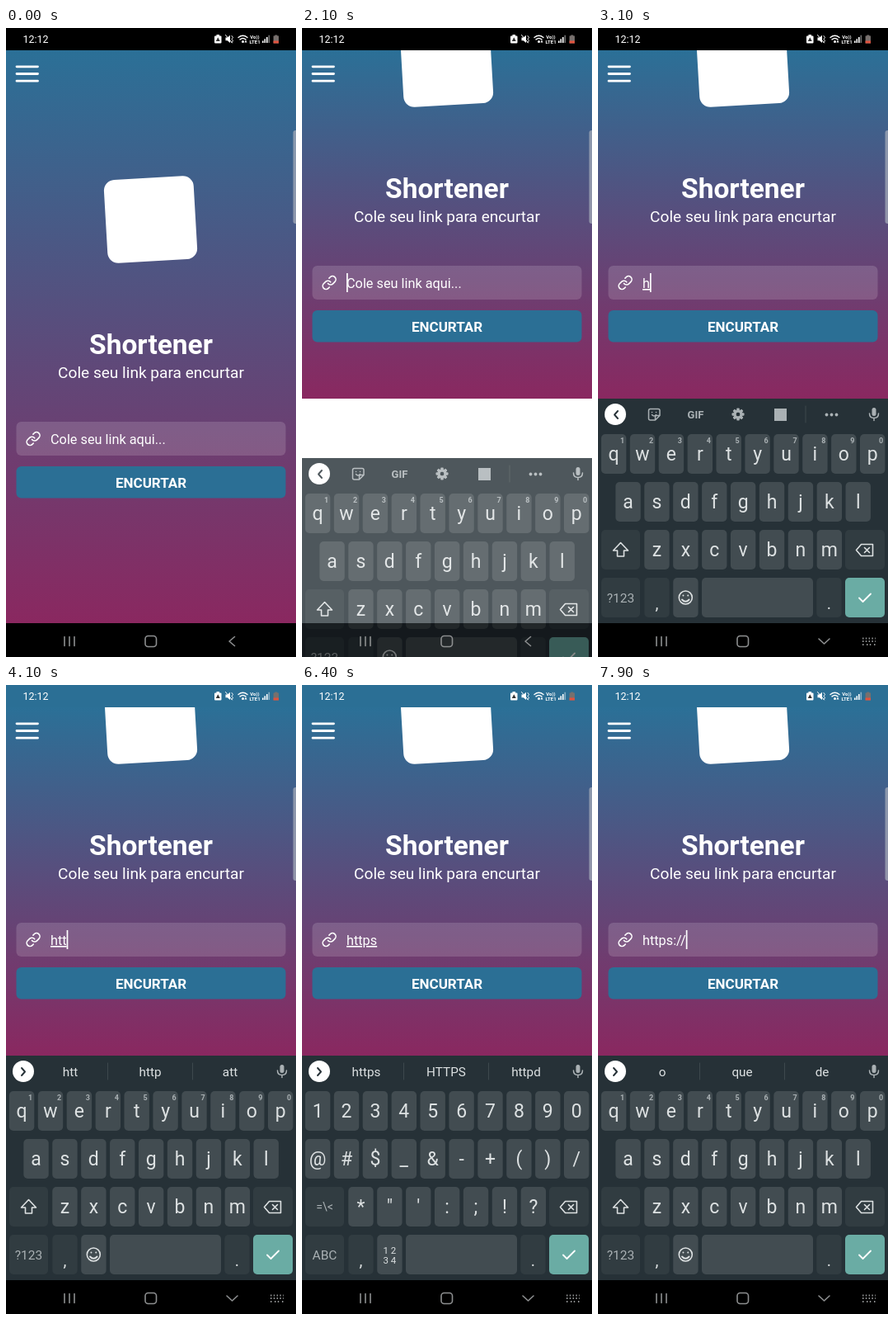
An HTML page that plays this animation: 352 by 762 pixels, repeating every 8000 ms.

```html
<!DOCTYPE html>
<html lang="pt">
<head>
<meta charset="utf-8">
<title>Shortener</title>
<style>
  html, body { margin: 0; width: 100%; height: 100%; overflow: hidden; background: #000; }
  svg { display: block; width: 100vw; height: 100vh; font-family: Roboto, "Noto Sans", sans-serif; }
  .mid { text-anchor: middle; }
  .line { fill: none; stroke-linecap: round; stroke-linejoin: round; }
</style>
</head>
<body>
<svg viewBox="0 0 352 762">
  <defs>
    <linearGradient id="sky" x1="0" y1="0" x2="0" y2="1">
      <stop offset="0" stop-color="#2b7097"/><stop offset="1" stop-color="#8a2860"/>
    </linearGradient>
    <clipPath id="view"><rect y="27" width="352" height="694"/></clipPath>
  </defs>

  <rect width="352" height="762" fill="#000"/>
  <rect y="27" width="352" height="694" fill="#fff"/>
  <rect id="page" y="27" width="352" height="694" fill="url(#sky)"/>
  <g clip-path="url(#view)">
    <g id="content" fill="#fff">
      <rect x="121" y="181.500" width="109" height="101" rx="13" transform="rotate(-3.300 175.500 232)"/>
      <text class="mid" x="176" y="395" font-size="33.500" font-weight="700">Shortener</text>
      <text class="mid" x="176" y="424" font-size="19.100">Cole seu link para encurtar</text>
      <rect x="12.500" y="477" width="327" height="41" rx="6" fill-opacity=".15"/>
      <g class="line" stroke="#fff" stroke-width="2" transform="translate(23.500 488) scale(.8)">
        <path d="M10 13a5 5 0 0 0 7.540.540l3-3a5 5 0 0 0-7.070-7.070l-1.720 1.710"/>
        <path d="M14 11a5 5 0 0 0-7.540-.540l-3 3a5 5 0 0 0 7.070 7.070l1.710-1.710"/>
      </g>
      <text id="field" x="54" y="504" font-size="16.300"></text>
      <rect id="caret" y="486" width="1.700" height="23"/>
      <rect x="12.500" y="531" width="327" height="38.500" rx="6" fill="#2b6f95"/>
      <text class="mid" x="176" y="557" font-size="17" font-weight="700">ENCURTAR</text>
    </g>
  </g>
  <path class="line" d="M13 46.800H38.500M13 55.500H38.500M13 64.200H38.500" stroke="#fff" stroke-width="2.800"/>
  <rect x="348.500" y="124" width="8" height="113" rx="3" fill="#a5abb8" opacity=".75"/>

  <rect id="statusBar" width="352" height="27"/>
  <g fill="#fff">
    <text x="20.500" y="18" font-size="12.500">12:12</text>
    <path d="M254 9.500h1.500v-1.500h3.500v1.500h1.500q1 0 1 1v7q0 1-1 1h-6.500q-1 0-1-1v-7q0-1 1-1z"/>
    <path d="M257.300 11.300l2.500 4.700h-5z" fill="#333"/>
    <path d="M266.500 11.500h2.300l3.200-2.800v9.300l-3.200-2.800h-2.300z"/>
    <path class="line" d="M266.500 8.500l8 9.500M274 9.500l1.500 2-1.500 2 1.500 2-1.500 2" stroke="#fff"/>
    <path class="line" d="M282 11.500q5.500-4.600 11 0M284 13.900q3.500-2.700 7 0" stroke="#fff" stroke-width="1.400"/>
    <circle cx="287.500" cy="16.600" r="1.500"/>
    <path d="M291 14.500l1.500 3h-3z"/>
    <text class="mid" x="302" y="12.500" font-size="6" font-weight="700">Vo))</text>
    <text class="mid" x="302" y="18.700" font-size="6" font-weight="700">LTE1</text>
    <path d="M311 15.500h1.600v2.500h-1.600zM313.500 13.300h1.600v4.700h-1.600zM316 11h1.600v7h-1.600z"/>
    <path d="M318.500 8.700h1.600v9.300h-1.600z" opacity=".45"/>
    <path d="M326.300 8.500h3v1h1.700v9h-6.400v-9h1.700z" fill="#77706e"/>
    <path d="M324.600 15.500h6.400v3h-6.400z" fill="#e0523e"/>
  </g>

  <g id="keyboard"></g>
  <rect id="navShade" y="721" width="352" height="41"/>
  <g class="line" stroke="#8d8f90" stroke-width="1.600">
    <path d="M71 737.500v11M77 737.500v11M83 737.500v11"/>
    <rect x="169" y="736.500" width="13.500" height="13" rx="3.500"/>
    <path id="back" d="M277.500 737.500l-6.500 5.500 6.500 5.500"/>
    <g id="hide">
      <path d="M268 740l6.500 6 6.500-6"/>
      <path d="M321 739.500h16M321 743h16M321 747h2M326 747h6M335 747h2" stroke-dasharray="1.500 2.300" stroke-linecap="butt" stroke-width="2"/>
    </g>
  </g>
</svg>
<script>
const LOOP = 8000;
const PITCH = 34.9, KEY_W = 30.4, KEY_H = 48;
const ROWS = [492, 550, 608, 666];
const KEY = "#424c51", DIM_KEY = "#313c41", INK = "#dde1e2", SOFT = "#aab1b4";
const el = id => document.getElementById(id);
const column = n => 19.1 + n * PITCH;
const escapeXml = s => s.replace(/&/g, "&amp;").replace(/</g, "&lt;");

const label = (text, x, y, size, fill = INK, extra = "") =>
  `<text class="mid" x="${x}" y="${y}" font-size="${size}" fill="${fill}" ${extra}>${escapeXml(text)}</text>`;
const box = (x, y, w, fill = KEY, h = KEY_H) =>
  `<rect x="${x}" y="${y}" width="${w}" height="${h}" rx="5" fill="${fill}"/>`;
const icon = (d, stroke = INK, width = 1.6) =>
  `<path class="line" d="${d}" stroke="${stroke}" stroke-width="${width}"/>`;

const spots = {};
function keyRow(chars, row, first, hints = "") {
  return [...chars].map((ch, i) => {
    const x = column(first + i), y = ROWS[row];
    spots[ch] = { x, y };
    return box(x - KEY_W / 2, y, KEY_W) + label(ch, x, y + 32, 23) +
      (hints ? label(hints[i], x + 10.5, y + 10.5, 9, SOFT, 'font-weight="700"') : "");
  }).join("");
}

function sharedKeys() {
  return box(4, ROWS[2], 47, DIM_KEY) + box(300, ROWS[2], 48, DIM_KEY) +
    icon("M319.500 625.500h14v14h-14l-6-7zM323.500 629.500l6 6M329.500 629.500l-6 6") +
    box(4, ROWS[3], 47, DIM_KEY) +
    box(56.3, ROWS[3], KEY_W, DIM_KEY) + label(",", 71.5, 704, 20) +
    box(91.2, ROWS[3], KEY_W) + box(126, ROWS[3], 135) +
    box(265.3, ROWS[3], KEY_W, DIM_KEY) + label(".", 280.5, 704, 20) +
    box(300, ROWS[3], 48, "#6aaca4") + icon("M317 690.500l4.500 4.500 9.500-9.500", "#fff", 1.8);
}

function letterKeys() {
  return keyRow("qwertyuiop", 0, 0, "1234567890") + keyRow("asdfghjkl", 1, .5) + keyRow("zxcvbnm", 2, 1.5) +
    icon("M27.500 623.500l9 9.500h-5v7h-8v-7h-5z") + label("?123", 27.5, 696, 15.5, SOFT) +
    `<circle class="line" cx="106.300" cy="690" r="8" stroke="${INK}" stroke-width="1.600"/>` +
    icon("M102 692.500q4.300 4.500 8.600 0M103.400 687.500h.1M109.200 687.500h.1", INK, 1.9);
}

function symbolKeys() {
  return keyRow("1234567890", 0, 0) + keyRow("@#$_&-+()/", 1, 0) + keyRow("*\"':;!?", 2, 1.5) +
    label("=\\<", 27.5, 637, 14, SOFT) + label("ABC", 27.5, 696, 15.5, SOFT) +
    label("1 2", 106.3, 688.5, 11.5) + label("3 4", 106.3, 700.5, 11.5);
}

function toolIcons() {
  const teeth = Array.from({ length: 8 }, (_, i) =>
    `<rect x="168.200" y="460.500" width="3.600" height="5" rx="1" transform="rotate(${i * 45} 170 468)"/>`).join("");
  return icon("M24 464l-4 4.500 4 4.500", "#263137", 1.9) +
    icon("M63.500 461.500h9.500q2 0 2 2v6l-5.500 5.500h-6q-2 0-2-2v-9.500q0-2 2-2zM75 469.500h-3.500q-2 0-2 2v3.500M65.500 468.500q2.500 3 5 0M65.500 465.500h.1M70.500 465.500h.1", SOFT, 1.5) +
    label("GIF", 118.5, 473, 13, SOFT, 'font-weight="700"') +
    `<g fill="${SOFT}">${teeth}</g><circle cx="170" cy="468" r="4" fill="none" stroke="${SOFT}" stroke-width="3"/>` +
    `<rect x="214" y="461" width="15" height="15" fill="${SOFT}"/>` +
    icon("M252 458v20", "#3d484d", 1) +
    [277.5, 283.5, 289.5].map(x => `<circle cx="${x}" cy="468.500" r="1.900" fill="${SOFT}"/>`).join("");
}

el("keyboard").innerHTML =
  `<rect y="449" width="352" height="272" fill="#263137"/>
   <circle cx="21" cy="468" r="13" fill="#fff"/>
   <g id="tools">${toolIcons()}</g>
   <g id="hints">${icon("M19 464l4 4.500-4 4.500", "#263137", 1.9)}
     ${icon("M123.500 458v20M226.500 458v20", "#3d484d", 1)}
     ${[78, 175, 272].map(x => label("", x, 474, 15.3)).join("")}</g>
   <rect x="332.500" y="460" width="5" height="10" rx="2.500" fill="${SOFT}"/>
   ${icon("M329.500 467q0 5.500 5.500 5.500t5.500-5.500M335 472.500v3", SOFT, 1.5)}
   ${sharedKeys()}<g id="letters">${letterKeys()}</g><g id="symbols">${symbolKeys()}</g>
   <g id="popup">${box(-18.5, -53, 37, "#566167", 101)}${label("", 0, -16, 29, "#fff")}</g>`;

// Each entry changes only the listed properties from its time on.
const timeline = [
  [0, { open: false, slide: 0, alpha: 1, text: "", underline: true, caret: false, hints: "", press: "", symbols: false, tinted: false }],
  [2100, { open: true, slide: 72, alpha: .81, caret: true }],
  [2200, { slide: 14, alpha: .97 }],
  [2300, { slide: 0, alpha: 1 }],
  [2600, { caret: false }],
  [3000, { press: "h" }],
  [3100, { press: "", text: "h", caret: true }],
  [3200, { hints: "h hoje há", tinted: true }],
  [3700, { press: "t", caret: false }],
  [3800, { press: "", text: "ht", caret: true, hints: "ht http ht" }],
  [3900, { press: "t" }],
  [4000, { press: "", text: "htt" }],
  [4100, { hints: "htt http att" }],
  [4600, { press: "p", caret: false }],
  [4700, { press: "", text: "http", caret: true, hints: "http https HTTP" }],
  [4900, { text: "https", hints: "https HTTPS httpd" }],
  [5400, { caret: false }],
  [5700, { symbols: true }],
  [5900, { caret: true }],
  [6400, { caret: false }],
  [6600, { press: ":" }],
  [6700, { press: "", text: "https:", underline: false, caret: true, hints: "o que de" }],
  [7200, { caret: false }],
  [7300, { press: "/" }],
  [7400, { press: "", text: "https:/", caret: true }],
  [7500, { press: "/" }],
  [7600, { press: "", text: "https://" }],
  [7900, { symbols: false }]
];

const stateAt = t => Object.assign({}, ...timeline.filter(([start]) => start <= t).map(([, change]) => change));
const show = (id, on) => el(id).setAttribute("display", on ? "inline" : "none");
const set = (id, name, value) => el(id).setAttribute(name, value);
const hintLabels = el("hints").querySelectorAll("text");

function render(t) {
  const s = stateAt(t), field = el("field"), settled = s.open && s.slide < 72;
  set("page", "height", s.open ? 422 : 694);
  set("content", "transform", `translate(0 ${s.open ? -189 : 0})`);
  set("statusBar", "fill", s.tinted ? "#2b6f95" : "#000");

  field.textContent = s.text || "Cole seu link aqui...";
  field.setAttribute("text-decoration", s.text && s.underline ? "underline" : "none");
  set("caret", "x", 54 + (s.text ? field.getComputedTextLength() : 0));
  show("caret", s.caret);

  show("keyboard", s.open);
  set("keyboard", "transform", `translate(0 ${s.slide})`);
  set("keyboard", "opacity", s.alpha);
  set("navShade", "opacity", s.slide ? .35 : 1);
  show("navShade", s.open);
  show("back", !settled);
  show("hide", settled);

  show("letters", !s.symbols);
  show("symbols", s.symbols);
  show("tools", !s.hints);
  show("hints", s.hints);
  s.hints.split(" ").forEach((word, i) => hintLabels[i].textContent = word);

  show("popup", s.press);
  if (s.press) {
    const { x, y } = spots[s.press];
    set("popup", "transform", `translate(${x} ${y})`);
    el("popup").querySelector("text").textContent = s.press;
  }
}

const began = performance.now();
function tick() {
  render((performance.now() - began) % LOOP);
  requestAnimationFrame(tick);
}
tick();
</script>
</body>
</html>
```
